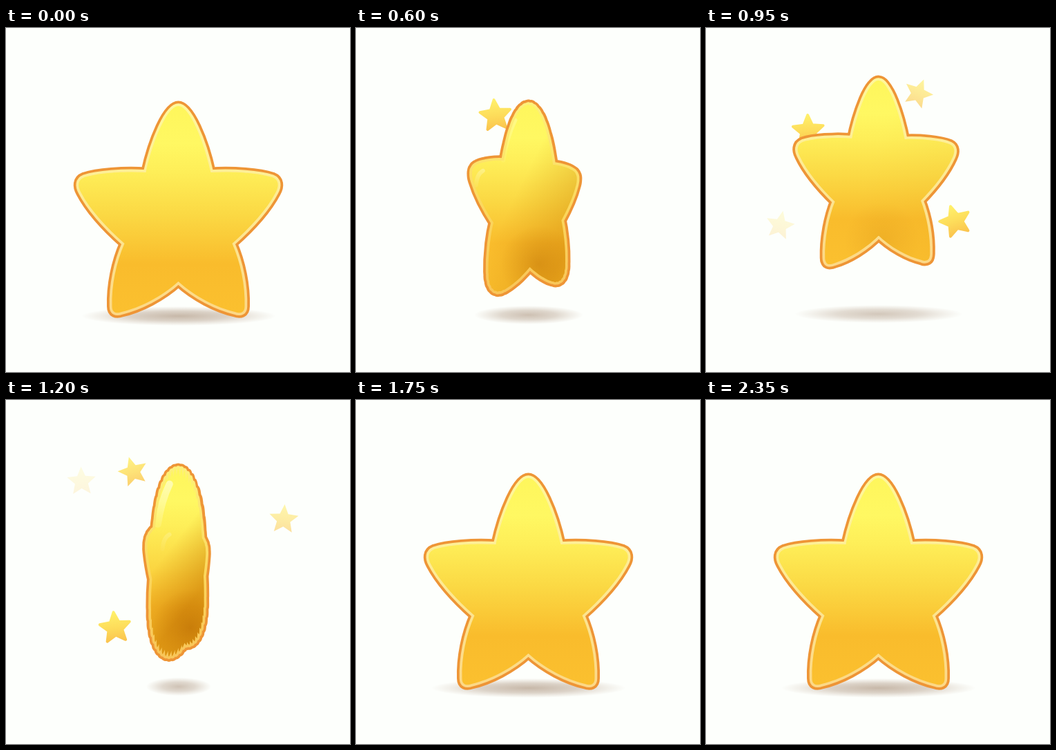
Write an HTML page with a canvas that moves like this. It is 498 by 498 pixels and loops after 2400 ms.

```html
<!DOCTYPE html>
<html lang="en">
<head>
<meta charset="utf-8">
<title>Jumping star</title>
<style>
  html, body { margin: 0; width: 100%; height: 100%; overflow: hidden; background: #fdfffc; }
  canvas { display: block; width: 498px; height: 498px; }
</style>
</head>
<body>
<canvas id="stage" width="498" height="498"></canvas>
<script>
const ctx = document.getElementById('stage').getContext('2d');
const LOOP = 2400, STEP = 50;
const CX = 249.5, CY = 275, FOOT = 138;
const DEPTH = 42, CAMERA = 1050, LAYERS = 10;

// Right half of the star as cubic curves, relative to its centre.
const half = [
  [0, -162], [16, -162], [37, -112], [47, -66],
  [80, -68], [118, -65], [136, -59],
  [146, -55], [146, -46], [141, -37],
  [128, -12], [104, 14], [78, 37],
  [90, 64], [97, 98], [96, 128],
  [96, 137], [90, 139], [82, 136],
  [56, 130], [24, 114], [0, 92]
];
const outline = half.concat(half.slice(0, -1).reverse().map(([x, y]) => [-x, y]));

// time, horizontal scale, vertical scale
const squash = [
  [0, 1, 1], [240, 1.04, .84], [300, 1.02, .863], [380, .99, .94], [450, .93, 1],
  [550, .84, .9], [600, .82, .88], [1200, .82, .88], [1400, .95, .97],
  [1480, 1.035, .87], [1580, .99, 1.01], [1650, 1, 1], [LOOP, 1, 1]
];
// time, degrees
const spin = [[0, 0], [450, 0], [600, 55], [950, 198], [1200, 260], [1430, 360], [LOOP, 360]];

// birth, time and place on the way out, tilt in degrees
const sparks = [
  [490, 600, 202, 127, -6],
  [600, 950, 107, 286, 12],
  [690, 950, 307, 95, 22],
  [840, 950, 148, 149, -2],
  [800, 950, 361, 280, -18],
  [920, 1200, 402, 173, 4],
  [980, 1200, 184, 104, -16],
  [1040, 1200, 158, 330, -6]
];
const LIFE = 400;

const clamp = (v, a = 0, b = 1) => Math.min(b, Math.max(a, v));
const easeOut = u => 1 - (1 - u) ** 4;

function sample(keys, t, col = 1) {
  let i = 0;
  while (i < keys.length - 2 && t >= keys[i + 1][0]) i++;
  const a = keys[i], b = keys[i + 1];
  return a[col] + (b[col] - a[col]) * (t - a[0]) / (b[0] - a[0]);
}

function fillStops(g, stops) {
  stops.forEach(([at, color]) => g.addColorStop(at, color));
  return g;
}

function poseAt(t) {
  const sx = sample(squash, t), sy = sample(squash, t, 2);
  const angle = sample(spin, t) * Math.PI / 180;
  const lift = Math.max(0, 73.1 - .00032 * (t - 931) ** 2);
  const cos = Math.cos(angle), sin = Math.sin(angle);
  return {
    sx, sy, cos, sin, lift,
    turn: Math.abs(sin), face: Math.abs(cos),
    cy: CY + FOOT * (1 - sy) - lift,
    halfWidth: Math.hypot(142 * sx * cos, DEPTH * sx * sin) + 8
  };
}

// A pillow-shaped star: slices along its depth, turned and projected.
function starPath(p) {
  const path = new Path2D();
  for (let i = -LAYERS; i <= LAYERS; i++) {
    const a = i / LAYERS * 1.32;
    const size = Math.cos(a) ** .7;
    const z = DEPTH * p.sx * Math.sin(a);
    const pts = outline.map(([px, py]) => {
      const x = px * size * p.sx;
      const f = CAMERA / (CAMERA - z * p.cos + x * p.sin);
      return [CX + (x * p.cos + z * p.sin) * f, p.cy + py * size * p.sy * f];
    });
    path.moveTo(...pts[0]);
    for (let k = 1; k < pts.length; k += 3) {
      path.bezierCurveTo(...pts[k], ...pts[k + 1], ...pts[k + 2]);
    }
    path.closePath();
  }
  return path;
}

function drawShadow(p) {
  const l = p.lift / 73;
  ctx.save();
  ctx.translate(CX + .5, 417 - 3 * l);
  ctx.scale(p.halfWidth * (.94 + .08 * l), 14 - l);
  const a = .46 - .1 * l;
  ctx.fillStyle = fillStops(ctx.createRadialGradient(0, 0, 0, 0, 0, 1), [
    [0, `rgba(135,100,70,${a})`],
    [.5, `rgba(140,105,75,${a * .65})`],
    [.8, `rgba(150,115,85,${a * .26})`],
    [1, 'rgba(150,115,85,0)']
  ]);
  ctx.beginPath();
  ctx.arc(0, 0, 1, 0, 7);
  ctx.fill();
  ctx.restore();
}

function drawSpark(t, [birth, seen, x, y, tilt]) {
  const u = (t - birth) / LIFE;
  if (u <= 0 || u >= 1) return;
  const k = easeOut(u) / easeOut((seen - birth) / LIFE);
  const r = 23.5 - 2 * u;
  ctx.save();
  ctx.globalAlpha = clamp((1 - u) / .55);
  ctx.translate(CX + (x - CX) * k, 230 + (y - 230) * k);
  ctx.fillStyle = ctx.strokeStyle = fillStops(
    ctx.createLinearGradient(0, -r, 0, r),
    [[0, '#fff06a'], [.5, '#fddc5a'], [1, '#fac04c']]);
  ctx.rotate(tilt * Math.PI / 180);
  ctx.beginPath();
  for (let i = 0; i < 10; i++) {
    const d = i % 2 ? r * .46 : r, a = i * Math.PI / 5;
    ctx.lineTo(Math.sin(a) * d, -Math.cos(a) * d);
  }
  ctx.closePath();
  ctx.lineWidth = 4;
  ctx.lineJoin = 'round';
  // One opaque-looking shape even while fading.
  if (ctx.globalAlpha === 1) ctx.stroke();
  ctx.fill();
  ctx.restore();
}

function streak(x1, y1, qx, qy, x2, y2, width, alpha) {
  if (alpha < .02) return;
  ctx.strokeStyle = fillStops(ctx.createLinearGradient(x1, y1, x2, y2), [
    [0, `rgba(255,255,225,${alpha})`], [1, `rgba(255,255,225,${alpha * .25})`]
  ]);
  ctx.lineWidth = width;
  ctx.beginPath();
  ctx.moveTo(x1, y1);
  ctx.quadraticCurveTo(qx, qy, x2, y2);
  ctx.stroke();
}

function drawStar(p) {
  const path = starPath(p);
  const top = p.cy - 162 * p.sy, bottom = p.cy + FOOT * p.sy;
  ctx.save();
  ctx.lineJoin = ctx.lineCap = 'round';
  ctx.strokeStyle = '#ee9536';
  ctx.lineWidth = 15;
  ctx.stroke(path);
  ctx.strokeStyle = fillStops(ctx.createLinearGradient(0, top, 0, bottom), p.turn > .5
    ? [[0, '#fdf07a'], [.6, '#fbd65c'], [1, '#f8c65a']]
    : [[0, '#fff79c'], [.5, '#fdea94'], [1, '#fcd886']]);
  ctx.lineWidth = 7.5;
  ctx.stroke(path);
  ctx.fillStyle = fillStops(ctx.createLinearGradient(0, top, 0, bottom), [
    [0, '#fef65c'], [.18, '#fff862'], [.32, '#feee58'], [.52, '#fbd944'],
    [.76, '#f9bc2c'], [1, '#fbc02f']
  ]);
  ctx.fill(path);

  ctx.clip(path);
  if (p.turn > .02) {
    ctx.fillStyle = fillStops(
      ctx.createLinearGradient(CX - 10, p.cy - 30, CX + p.halfWidth, p.cy + 15), [
        [0, 'rgba(205,125,0,0)'], [1, `rgba(200,120,0,${.6 * p.turn ** 2})`]
      ]);
    ctx.fillRect(0, 0, 498, 498);
  }
  const crease = Math.max(.5 * p.turn ** 2, clamp((1 - p.sy) * 1.2, 0, .2) * p.face);
  if (crease > .01) {
    const x = CX + 18 * p.turn, y = p.cy + 100 * p.sy;
    ctx.fillStyle = fillStops(ctx.createRadialGradient(x, y, 0, x, y, 55), [
      [0, `rgba(180,100,0,${crease})`], [1, 'rgba(190,110,0,0)']
    ]);
    ctx.fillRect(0, 0, 498, 498);
  }
  const shift = 16 * p.face, shine = p.turn ** 4;
  streak(CX - 10 - shift, p.cy - 120, CX - 22 - shift, p.cy - 95,
    CX - 27 - shift, p.cy - 62, 5 + 6 * p.turn ** 8, .65 * shine);
  const sx = CX - 132 * p.face;
  streak(sx + 10, p.cy - 47, sx + 1, p.cy - 42, sx, p.cy - 26, 6,
    clamp(1.6 * p.face) * shine * .8);
  ctx.restore();
}

function draw(ms) {
  const t = Math.floor((ms % LOOP) / STEP) * STEP;
  const p = poseAt(t);
  ctx.fillStyle = '#fdfffc';
  ctx.fillRect(0, 0, 498, 498);
  drawShadow(p);
  sparks.forEach(s => drawSpark(t, s));
  drawStar(p);
}

const start = performance.now();
function tick() {
  draw(performance.now() - start);
  requestAnimationFrame(tick);
}
tick();
</script>
</body>
</html>
```
